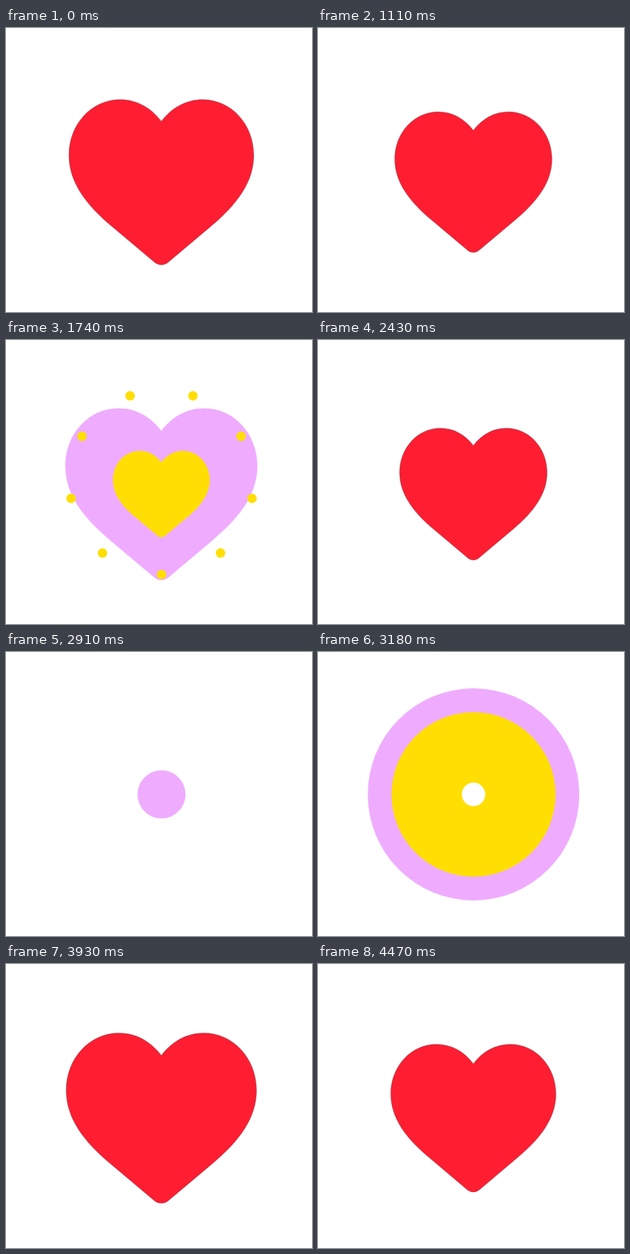
Animation of 389x360 px, one loop 4500 ms. Source, as an HTML page with a canvas:

```html
<!DOCTYPE html>
<html lang="en">
<head>
<meta charset="utf-8">
<title>Heart burst</title>
<style>
html, body { margin: 0; width: 100%; height: 100%; overflow: hidden; background: #fff; }
canvas { display: block; }
</style>
</head>
<body>
<canvas id="stage" width="389" height="360"></canvas>
<script>
const ctx = document.getElementById('stage').getContext('2d');
const LOOP = 4500, REPEAT = 1770;
const RED = '#ff1d32', PINK = '#efacff', YELLOW = '#ffde03';
const CX = 197.7, CY = 180.5, RING = 146;

// Right half of the heart; the left half is its mirror image
const half = new Path2D(`M0-77 C13-94 31-104.5 52.5-104.5 C89-104.5 117.5-73 117.5-34
  C117.5 0 96 29 62 57 L9 101.5 C6.5 103.7 3.3 105 0 105`);
const heartPath = new Path2D(half);
heartPath.addPath(half, new DOMMatrix([-1, 0, 0, 1, 0, 0]));

const span = (t, start, length) => Math.min(1, Math.max(0, (t - start) / length));
const easeOut = p => 1 - (1 - p) ** 3;
const fallOff = p => Math.cos(p * Math.PI / 2);

// Rises from zero to the peak, then sinks back to zero
function pulse(t, start, rise, fall, peak) {
  const up = Math.sin(span(t, start, rise) * Math.PI / 2);
  return peak * up * fallOff(span(t, start + rise, fall));
}

function redScale(t) {
  if (t < 1200) return fallOff(span(t, 390, 2114)) * (1 - span(t, 1110, 90));
  return t < 3000 ? pulse(t, 1830, 300, 679, 1.04) : pulse(t, 3600, 300, 1722, 1.03);
}

function disc(x, y, r, color) {
  ctx.fillStyle = color;
  ctx.beginPath();
  ctx.arc(x, y, r, 0, 2 * Math.PI);
  ctx.fill();
}

function heart(scale, color, edge) {
  if (scale < .01) return;
  ctx.save();
  ctx.translate(197.5, 195.2);
  ctx.scale(scale, scale);
  ctx.fillStyle = color;
  ctx.fill(heartPath);
  if (edge) {
    ctx.strokeStyle = edge;
    ctx.lineWidth = .6 / scale;
    ctx.stroke(heartPath);
  }
  ctx.restore();
}

function ring(t) {
  if (t > 1604) return;
  disc(CX, CY, RING * easeOut(span(t, 1100, 545)), PINK);
  disc(CX, CY, RING * easeOut(span(t, 1225, 545)), YELLOW);
  disc(CX, CY, (RING + 1) * easeOut(span(t, 1404, 200)), '#fff');
}

function dots(t) {
  const reach = 120 * easeOut(span(t, 1440, 430));
  const size = pulse(t, 1440, 200, 190, 9);
  for (let i = 0; i < 9; i++) {
    const angle = Math.PI / 2 + i * 2 * Math.PI / 9;
    disc(CX + reach * Math.cos(angle), CY + reach * Math.sin(angle), size, YELLOW);
  }
}

function draw(t) {
  const burst = t < 2400 ? t : t - REPEAT;
  ctx.fillStyle = '#fff';
  ctx.fillRect(0, 0, 389, 360);
  ring(burst);
  heart(pulse(burst, 1461, 170, 482, 1.11), PINK);
  heart(pulse(burst, 1592, 377, 300, .9), YELLOW);
  heart(redScale(t), RED, 'rgba(80,70,70,.6)');
  dots(burst);
}

const start = performance.now();
function tick() {
  draw((performance.now() - start) % LOOP);
  requestAnimationFrame(tick);
}
tick();
</script>
</body>
</html>
```
